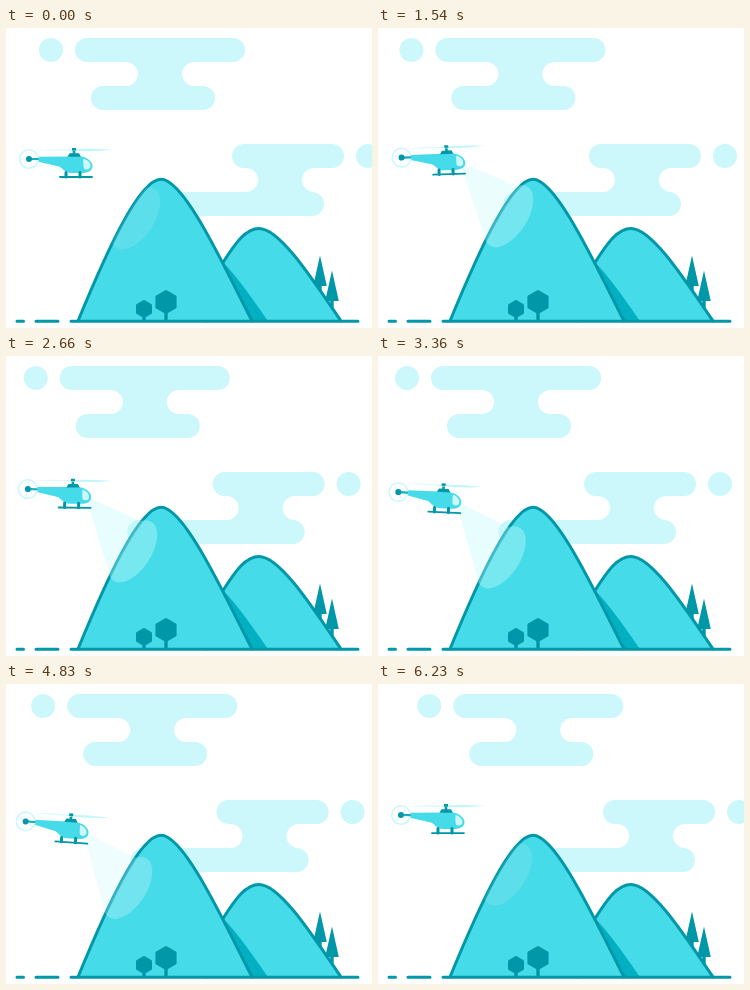
Recreate the animation shown at these times as an HTML page with a canvas. Size 366x300 px, loop 6300 ms.

```html
<!DOCTYPE html>
<html lang="en">
<head>
<meta charset="utf-8">
<title>Helicopter search</title>
<style>
html, body { margin: 0; width: 100%; height: 100%; overflow: hidden; background: #fff; }
canvas { display: block; width: 366px; height: 300px; }
</style>
</head>
<body>
<canvas id="stage" width="366" height="300"></canvas>
<script>
const ctx = document.getElementById('stage').getContext('2d');
const LOOP = 6300, STEP = 70;
const DARK = '#0097a9', CYAN = '#46dbe8', SHADE = '#02b0c2', PALE = '#ccf7fb';

const rad = deg => deg * Math.PI / 180;
const mix = (a, b, u) => a + (b - a) * u;
const progress = (t, from, to) => Math.min(1, Math.max(0, (t - from) / (to - from)));
const easeIn = u => u * u;
const easeOut = u => 1 - (1 - u) ** 2.4;
const easeInOut = u => (1 - Math.cos(Math.PI * u)) / 2;

// The helicopter climbs a little, sinks, then returns to its rest height.
const CLIMBED = 1250, SUNK = 4400;
function sway(t, rest, high, low) {
  if (t < CLIMBED) return mix(rest, high, easeInOut(progress(t, 0, CLIMBED)));
  if (t < SUNK) return mix(high, low, easeInOut(progress(t, CLIMBED, SUNK)));
  return mix(low, rest, easeInOut(progress(t, SUNK, LOOP)));
}

const topCloudX = t => t < 3700
  ? mix(69, 53, easeOut(progress(t, 0, 3700)))
  : mix(53, 75.3, easeInOut(progress(t, 3900, 6150)));

const lowCloudX = t => t < 3500
  ? mix(226, 206, easeOut(progress(t, 0, 3500)))
  : mix(206, 226, easeIn(progress(t, 3500, LOOP)));

const beamLevel = t => easeInOut(progress(t, 1050, 1700)) * easeInOut(progress(t, 5350, 4550));

function fill(path, color) {
  ctx.fillStyle = color;
  ctx.fill(typeof path === 'string' ? new Path2D(path) : path);
}

function stroke(path, color, width) {
  ctx.strokeStyle = color;
  ctx.lineWidth = width;
  ctx.stroke(typeof path === 'string' ? new Path2D(path) : path);
}

function circle(x, y, r) {
  const p = new Path2D();
  p.arc(x, y, r, 0, 2 * Math.PI);
  return p;
}

function bar(x0, x1, y) {
  const p = new Path2D();
  p.roundRect(x0, y, x1 - x0, 24, 12);
  fill(p, PALE);
}

function cloud(x, y, { top, bottom, neck, dot }) {
  const [left, right] = neck;
  ctx.save();
  ctx.translate(x, y);
  bar(0, top, 0);
  bar(...bottom, 48);
  const joint = new Path2D();
  joint.moveTo(left, 23.5);
  joint.arc(left, 36, 12, rad(-90), rad(90));
  joint.lineTo(left, 48.5);
  joint.lineTo(right, 48.5);
  joint.arc(right, 36, 12, rad(90), rad(270));
  joint.lineTo(right, 23.5);
  fill(joint, PALE);
  fill(circle(dot, 12, 12), PALE);
  ctx.restore();
}

const topCloud = { top: 170, bottom: [16, 140], neck: [51, 119], dot: -24 };
const lowCloud = { top: 112, bottom: [-85.5, 92], neck: [14, 82], dot: 136 };

function pine(x, y) {
  fill(`M${x} ${y}l6.8 30.5h-13.6zM${x - 1.7} ${y + 30}h3.4v21h-3.4z`, DARK);
}

function roundTree(x, y, r) {
  const crown = new Path2D();
  for (let i = 0; i < 6; i++) {
    const a = rad(60 * i - 90);
    crown.lineTo(x + (r - 1.5) * Math.cos(a), y + (r - 1.5) * Math.sin(a));
  }
  crown.closePath();
  fill(crown, DARK);
  stroke(crown, DARK, 3);
  ctx.fillRect(x - 1.7, y, 3.4, 293 - y);
}

const mainHill = new Path2D('M72 293C100 225 133 151.3 155 151.3C178 151.3 217 236 246 293');
const backHill = new Path2D('M200 293L217 234.5C230 214 240 200.4 253 200.4C274 200.4 307 252 335 293');

// The lit patch; with a nose point it widens into the whole light cone.
function lightPath({ x, y }, nose) {
  const p = new Path2D();
  const half = nose ? 123 : 180;
  if (nose) p.moveTo(nose.x, nose.y);
  p.ellipse(x, y, 18.4, 35, rad(33), rad(-half), rad(half));
  if (nose) p.lineTo(nose.x - 2, nose.y + 5);
  p.closePath();
  return p;
}

function landscape(spot) {
  pine(314, 227.5);
  pine(326, 242.5);
  fill(backHill, CYAN);
  fill('M214 232C228 244 246 270 262 293H240z', SHADE);
  stroke(backHill, DARK, 3);
  fill(mainHill, CYAN);
  stroke(mainHill, DARK, 3);
  ctx.save();
  ctx.clip(mainHill);
  fill(lightPath(spot), 'rgba(255,255,255,.12)');
  ctx.restore();
  roundTree(138, 281, 9);
  roundTree(160, 274, 12);
  stroke('M11 293.3H17.5M30 293.3H52M65 293.3H352', DARK, 3);
}

// Drawn with the tail rotor hub at the origin.
function helicopter(t) {
  fill('M9 -2.3L40 -2.6Q45 -3.5 52 -2.5C59 -1.5 63.5 3 63.5 7C63.5 12 59 14 53 14H42C36 14 34 9.5 30 7.5L9 2.8z', CYAN);
  const glass = new Path2D('M54 -.8C58.5 0 62 3.3 62 6.8C62 9.5 60 11 57.5 11C55 11 54 9.5 54 7z');
  fill(glass, PALE);
  stroke(glass, CYAN, 1);
  stroke('M37 13.5V18M51 13.5V18', DARK, 3);
  stroke('M31 18H63', DARK, 1.8);
  fill('M38.5 -2.2L40.5 -5.7H50L52 -2.2zM43.7 -8h2.6v4h-2.6z', DARK);
  fill('M6 -8.8Q25 -10.2 45 -9.5V-8.5Q25 -8.2 6 -8.8z', '#d9f9fc');
  fill('M40 -9.3Q62 -11 84 -9.2Q62 -7 40 -8.4z', '#c0f5fa');
  fill('M43 -11h4v2.6h-4z', DARK);

  const ring = circle(0, 0, 9.3);
  fill(ring, 'rgba(255,255,255,.45)');
  stroke(ring, PALE, 1.6);
  ctx.save();
  ctx.rotate(rad(t / STEP * 50));
  stroke('M-7 0H7', '#dffafc', 1.6);
  ctx.restore();
  stroke('M0 0H9', '#16aebe', 2.2);
  fill(circle(0, 0, 3), DARK);
}

function draw(t) {
  ctx.fillStyle = '#fff';
  ctx.fillRect(0, 0, 366, 300);
  ctx.lineCap = ctx.lineJoin = 'round';

  cloud(topCloudX(t), 10, topCloud);
  cloud(lowCloudX(t), 116, lowCloud);

  const spot = { x: sway(t, 129.5, 131, 120.8), y: sway(t, 190.5, 187.8, 205.8) };
  landscape(spot);

  const x = sway(t, 23, 23.7, 19.2), y = sway(t, 131, 129.4, 138.3);
  const tilt = rad(sway(t, 0, -1.9, 4.4));
  const cos = Math.cos(tilt), sin = Math.sin(tilt);
  const nose = { x: x + 62 * cos - 8 * sin, y: y + 62 * sin + 8 * cos };
  fill(lightPath(spot, nose), `rgba(180,247,250,${0.3 * beamLevel(t)})`);

  ctx.save();
  ctx.translate(x, y);
  ctx.rotate(tilt);
  helicopter(t);
  ctx.restore();
}

const start = performance.now();
function frame() {
  const t = (performance.now() - start) % LOOP;
  draw(Math.floor(t / STEP) * STEP);
  requestAnimationFrame(frame);
}
frame();
</script>
</body>
</html>
```
